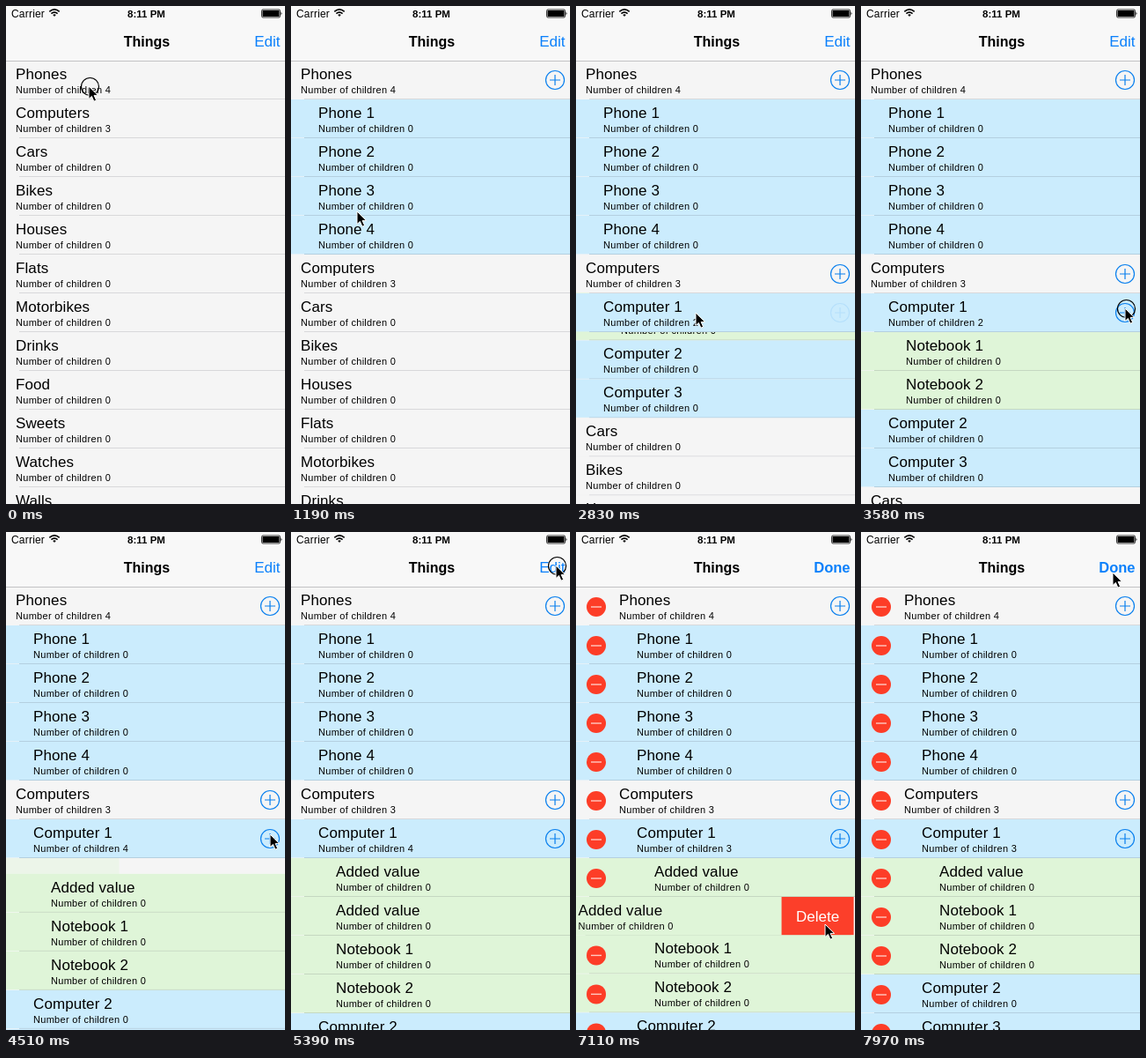
Recreate the animation shown at these times as an HTML page. Size 317x565 px, loop 8000 ms.

```html
<!DOCTYPE html>
<html lang="en">
<head>
<meta charset="utf-8">
<title>Things</title>
<style>
  html, body { margin: 0; width: 100%; height: 100%; overflow: hidden; background: #f5f5f5; }
  svg { display: block; width: 317px; height: 565px; }
  text { font-family: "Liberation Sans", Arial, sans-serif; fill: #000; white-space: pre; }
  .title { font-size: 17px; letter-spacing: .1px; }
  .sub { font-size: 11px; letter-spacing: .3px; }
  .bold { font-weight: bold; }
  .blue { fill: #0b80fb; }
  .line { fill: none; stroke: #0b80ee; stroke-width: 1.2; }
</style>
</head>
<body>
<svg viewBox="0 0 317 565" xmlns="http://www.w3.org/2000/svg">
  <rect width="317" height="565" fill="#f5f5f5"/>
  <g id="list"></g>
  <g id="bar">
    <rect width="317" height="62" fill="#f8f8f8"/>
    <rect y="62" width="317" height="1" fill="#c3c3c5"/>
    <text x="6" y="12.5" font-size="12" letter-spacing=".2">Carrier</text>
    <g fill="none" stroke="#000" stroke-width="1.6">
      <path d="M49.3 6.4Q55 1.4 60.7 6.4M51.4 8.7Q55 5.5 58.6 8.7"/>
      <path d="M53.2 10L55 12L56.8 10Q55 8.4 53.2 10Z" fill="#000" stroke="none"/>
    </g>
    <text class="bold" x="159.5" y="12.5" font-size="11.5" text-anchor="middle">8:11 PM</text>
    <rect x="290.5" y="4" width="21" height="9" rx="1.5" fill="none" stroke="#000" stroke-width=".8"/>
    <rect x="291.5" y="5" width="19" height="7" rx=".6"/>
    <path d="M312.5 7Q314.5 8.5 312.5 10Z"/>
    <text class="bold" x="160" y="46" font-size="16" text-anchor="middle">Things</text>
    <text id="edit" class="blue" x="311.5" y="46" font-size="17" text-anchor="end">Edit</text>
    <text id="done" class="blue bold" x="311.5" y="46" font-size="16.5" text-anchor="end">Done</text>
  </g>
  <g id="mouse">
    <circle id="press" cx="1.5" cy=".5" r="10" fill="none" stroke="#000" stroke-width="1.2"/>
    <path d="M0 0V14.5L3.4 11.4L5.9 17.2L8.6 16L6.1 10.4H10.6Z" fill="#000" stroke="#fff" stroke-width="1" stroke-linejoin="round"/>
  </g>
</svg>
<script>
const LOOP = 8000, ANIM = 300, ROW = 44, TOP = 62, WIDTH = 317, DELETE_W = 82;
const OPEN_PHONES = 720, OPEN_COMPUTERS = 1700, OPEN_FIRST = 2770;
const ADD_A = 3700, ADD_B = 4380, EDIT = 5400, ASK = 6320, REMOVE = 7090;
const COLORS = ['#f5f5f5', '#cbecfd', '#dff5d8'];

const $ = id => document.getElementById(id);
const make = (tag, attrs, parent, text) => {
  const el = document.createElementNS('http://www.w3.org/2000/svg', tag);
  for (const k in attrs) el.setAttribute(k, attrs[k]);
  if (text) el.textContent = text;
  if (parent) parent.appendChild(el);
  return el;
};
const ease = (t, start) => {
  const u = Math.min(1, Math.max(0, (t - start) / ANIM));
  return u * u * (3 - 2 * u);
};
const move = (el, x, y) => el.setAttribute('transform', `translate(${x.toFixed(2)} ${y.toFixed(2)})`);

// lift: how many rows high an unfolding row starts above its place
const row = (title, depth = 0, count = 0, born = -LOOP, lift = 0, opts = {}) =>
  ({ title, depth, count, born, lift, ...opts });
const unfold = (name, n, depth, born, opts = {}) =>
  Array.from({ length: n }, (_, i) => row(`${name} ${i + 1}`, depth, 0, born, n - i, i ? {} : opts));

const computers = unfold('Computer', 3, 1, OPEN_COMPUTERS, { opened: OPEN_FIRST });
computers[0].countAt = t => t < ADD_A ? 2 : t < ADD_B ? 3 : t < REMOVE ? 4 : 3;
const rows = [
  row('Phones', 0, 4, -LOOP, 0, { opened: OPEN_PHONES }),
  ...unfold('Phone', 4, 1, OPEN_PHONES),
  row('Computers', 0, 3, -LOOP, 0, { opened: OPEN_COMPUTERS }),
  computers[0],
  row('Added value', 2, 0, ADD_B),
  row('Added value', 2, 0, ADD_A, 0, { removed: REMOVE }),
  ...unfold('Notebook', 2, 2, OPEN_FIRST),
  ...computers.slice(1),
  ...['Cars', 'Bikes', 'Houses', 'Flats', 'Motorbikes', 'Drinks', 'Food', 'Sweets', 'Watches', 'Walls']
    .map(name => row(name))
];

function build(r) {
  const fill = COLORS[r.depth], x = 11 + 20 * r.depth;
  r.el = make('g');
  make('rect', { width: WIDTH, height: 43.4, fill }, r.el);
  make('rect', { x: 15, y: 43, width: WIDTH - 15, height: 1, fill }, r.el);
  make('rect', { x: 15, y: 43, width: WIDTH - 15, height: 1, fill: '#32323c', opacity: .15 }, r.el);
  r.minus = make('g', {}, r.el);
  make('circle', { cx: 23, cy: 23, r: 11, fill: '#fd3d27' }, r.minus);
  make('path', { d: 'M17 23H29', stroke: '#ffc9c0', 'stroke-width': 1.4 }, r.minus);
  r.words = make('g', {}, r.el);
  make('text', { class: 'title', x, y: 21 }, r.words, r.title);
  r.sub = make('text', { class: 'sub', x, y: 37 }, r.words, `Number of children ${r.count}`);
  if (r.opened) {
    r.plus = make('g', { class: 'line' }, r.el);
    make('circle', { cx: 300, cy: 22, r: 10.5 }, r.plus);
    make('path', { d: 'M294 22H306M300 16V28' }, r.plus);
  }
  if (r.removed) {
    r.button = make('g', {}, r.el);
    make('rect', { width: DELETE_W, height: 43.4, fill: '#fd3d27' }, r.button);
    make('text', { x: 41, y: 28, 'font-size': 17, 'text-anchor': 'middle', style: 'fill:#fff' }, r.button, 'Delete');
  }
}
rows.forEach(build);
// newer rows lie beneath older ones
[...rows].sort((a, b) => b.born - a.born).forEach(r => $('list').appendChild(r.el));

const path = [
  [0, 94, 91], [880, 94, 91], [1190, 75, 233], [1510, 112, 314], [2050, 112, 314],
  [2350, 136, 348], [2950, 136, 348], [3460, 300, 343], [4700, 300, 343], [5110, 301, 38],
  [5540, 301, 38], [6070, 25, 444], [6420, 25, 444], [6860, 283, 445], [7230, 283, 445],
  [7690, 286, 71], [7900, 286, 46], [LOOP, 286, 46]
];
const presses = [[0, 60], [540, 720], [1560, 1700], [2590, 2770], [3520, 3700],
  [4220, 4380], [5220, 5400], [6200, 6320], [6910, 7090]];

// speed at a point; none where the pointer rests on either side
function slope(i, k) {
  const a = path[i - 1], b = path[i], c = path[i + 1];
  if (!a || !c) return 0;
  const still = (p, q) => p[1] === q[1] && p[2] === q[2];
  return still(a, b) || still(b, c) ? 0 : (c[k] - a[k]) / (c[0] - a[0]);
}
function pointer(t, k) {
  let i = 0;
  while (i < path.length - 2 && path[i + 1][0] <= t) i++;
  const a = path[i], b = path[i + 1], d = b[0] - a[0], u = (t - a[0]) / d, v = 1 - u;
  return a[k] * v * v * (1 + 2 * u) + b[k] * u * u * (3 - 2 * u)
    + d * u * v * (slope(i, k) * v - slope(i + 1, k) * u);
}

function draw(t) {
  const edit = ease(t, EDIT), ask = ease(t, ASK);
  let y = TOP;
  for (const r of rows) {
    const p = ease(t, r.born) * (r.removed ? 1 - ease(t, r.removed) : 1);
    r.el.setAttribute('display', p > 0 && y < 565 ? 'inline' : 'none');
    if (r.lift) move(r.el, 0, y - ROW * r.lift * (1 - p));
    else {
      move(r.el, -WIDTH * (1 - p), y);
      r.el.setAttribute('opacity', p);
    }
    const slide = r.removed ? ask : 0;
    move(r.words, 38 * edit - DELETE_W * slide, 0);
    move(r.minus, -38 * (1 - edit), 0);
    r.minus.setAttribute('opacity', edit * (1 - slide));
    if (r.plus) r.plus.setAttribute('opacity', ease(t, r.opened));
    if (r.button) {
      move(r.button, 320 - DELETE_W * slide, 0);
      r.button.setAttribute('opacity', slide > 0 ? 1 : 0);
    }
    if (r.countAt) r.sub.textContent = `Number of children ${r.countAt(t)}`;
    y += ROW * p;
  }
  $('edit').setAttribute('opacity', t < EDIT ? 1 : 0);
  $('done').setAttribute('opacity', t < EDIT ? 0 : 1);
  move($('mouse'), Math.round(pointer(t, 1)), Math.round(pointer(t, 2)));
  $('press').setAttribute('opacity', presses.some(([a, b]) => t >= a && t < b) ? 1 : 0);
}

const start = performance.now();
function tick() {
  draw((performance.now() - start) % LOOP);
  requestAnimationFrame(tick);
}
draw(0);
requestAnimationFrame(tick);
</script>
</body>
</html>
```
